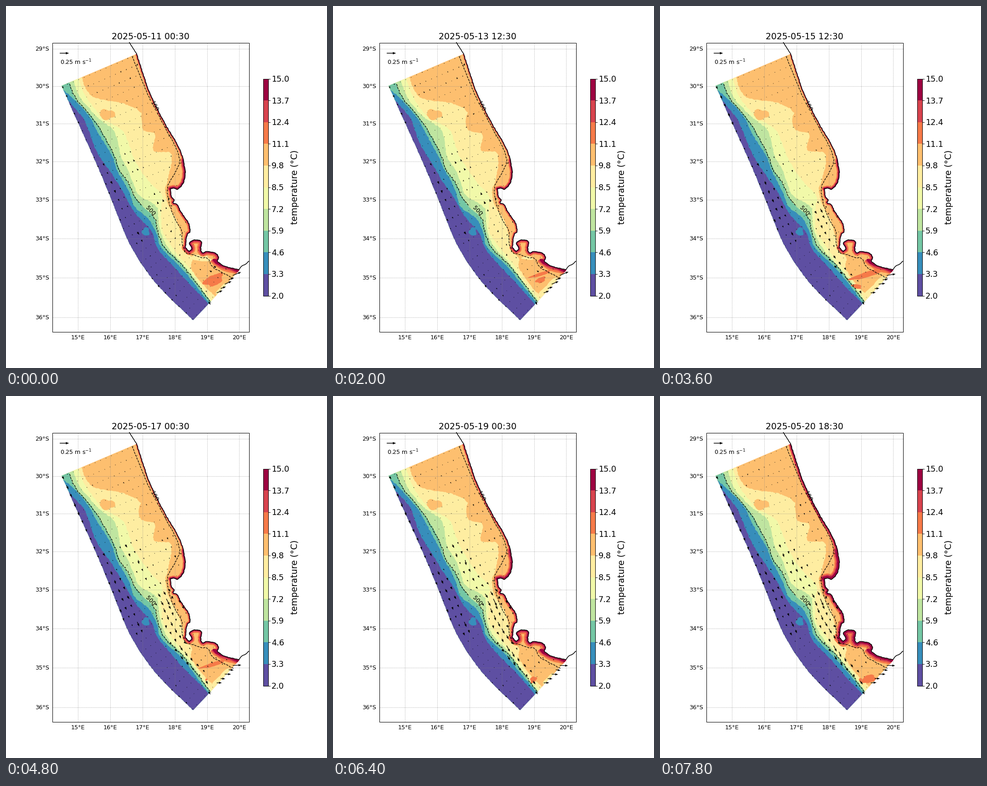
Write a matplotlib script that moves like this. It is 705 px wide and 794 px high and loops after 8 s.

```python
import numpy as np
import matplotlib.pyplot as plt
from matplotlib.animation import FuncAnimation
from matplotlib.patches import Polygon, Rectangle
from matplotlib.path import Path

W, H, DPI = 705, 794, 100
PT = 72 / DPI
KEYS = [0, 6, 14, 18, 24, 32, 39]
START = np.datetime64("2025-05-11T00:30")
LEVELS = np.linspace(2, 15, 11)
COLORS = plt.get_cmap("Spectral_r")(np.linspace(0, 1, 10))
rng = np.random.default_rng(7)

plt.rcParams["font.family"] = "DejaVu Sans"
fig = plt.figure(figsize=(W / DPI, H / DPI), dpi=DPI, facecolor="white")
ax = fig.add_axes([0, 0, 1, 1])
ax.set(xlim=(0, W), ylim=(H, 0))
ax.axis("off")


# ---------- helpers ----------
def arc_length(p):
    return np.r_[0, np.cumsum(np.hypot(*np.diff(p, axis=0).T))]


def along(pts, s):
    """Points at the fractions s of a polyline's length."""
    p = np.asarray(pts, float)
    arc = arc_length(p)
    return np.c_[np.interp(s * arc[-1], arc, p[:, 0]), np.interp(s * arc[-1], arc, p[:, 1])]


def smooth(pts):
    """One round of corner cutting, end points kept."""
    p = np.asarray(pts, float)
    a, b = p[:-1], p[1:]
    cut = np.stack([0.8 * a + 0.2 * b, 0.2 * a + 0.8 * b], 1).reshape(-1, 2)
    return np.vstack([p[:1], cut, p[-1:]])


def rough(pts, amp=0.7, step=3):
    p = smooth(pts)
    p = along(p, np.linspace(0, 1, max(int(arc_length(p)[-1] / step), 2) + 1))
    p[1:-1] += rng.uniform(-amp, amp, (len(p) - 2, 2))
    return p


def label(x, y, s, px, **kw):
    return ax.text(x, y, s, fontsize=px * PT, **{"va": "baseline", "zorder": 9, **kw})


# ---------- coast and model domain ----------
NORTH = [(287, 105), (302, 152), (317, 196), (350, 260), (381, 311), (390, 338)]
BAY = [(390, 338), (395, 373), (388, 392), (376, 404), (371, 399), (361, 401)]
WEST = [(361, 401), (363, 420), (371, 425), (366, 432), (377, 435), (384, 452),
        (402, 476), (405, 495), (397, 501), (394, 530)]
SOUTH = [(394, 530), (402, 539), (409, 533), (401, 520), (410, 513), (431, 514),
         (427, 535), (433, 543), (441, 537), (464, 543), (468, 553), (462, 560),
         (484, 573), (512, 578)]
OFFSHORE = [(122, 175), (160, 260), (195, 337), (232, 425), (265, 510),
            (290, 555), (324, 603), (360, 641), (411, 689)]

sections = [rough(s, 0.6) for s in (NORTH, BAY, WEST, SOUTH)]
coast = np.vstack([rough([(271, 80), (279, 93), NORTH[0]], 0.4), *sections,
                   rough([SOUTH[-1], (516, 571), (527, 566), (533, 560)], 0.4)])
domain_pts = np.vstack([*sections, [(512, 580), (447, 651)], rough(OFFSHORE, 0.5)[::-1]])
domain = ax.add_patch(Polygon(domain_pts, fc=COLORS[6], ec="none", zorder=1))


def region(band, z):
    p = ax.add_patch(Polygon(np.zeros((3, 2)), fc=COLORS[band], ec="none", zorder=z))
    p.set_clip_path(domain)
    return p


# ---------- isotherms ----------
# Where each isotherm crosses a set of heights, from cold to warm.
ROWS = [160, 200, 245, 270, 300, 330, 360, 390, 415, 440, 465, 495, 530, 570, 650]
T33 = [100, 130, 170, 180, 190, 206, 226, 245, 262, 275, 291, 322, 331, 366, 441]
T46 = [95, 146, 186, 198, 215, 234, 244, 262, 273, 279, 314, 330, 337, 383, 446]
T59 = [136, 150, 190, 207, 224, 239, 248, 271, 280, 299, 328, 333, 346, 390, 450]
T72 = [147, 161, 200, 238, 246, 250, 269, 281, 288, 334, 335, 338, 354, 393, 452]
T85 = [160, 174, 209, 257, 268, 278, 296, 318, 345, 342, 341, 342, 365, 399, 455]
T98 = [(167, 156), (174, 178), (188, 200), (220, 208), (250, 210), (297, 228),
       (297, 265), (303, 276), (331, 279), (321, 319), (345, 320), (361, 319),
       (365, 340), (356, 383), (348, 402), (355, 438), (373, 464), (386, 500),
       (390, 535), (411, 553), (405, 572), (420, 596), (440, 620), (462, 640)]


class Isotherm:
    """Everything offshore of the line takes the colour below its level."""

    def __init__(self, pts, band):
        self.line = rough(pts, 0.9)
        self.k = np.arange(len(self.line))
        self.phase = rng.uniform(0, 6)
        # a warm lobe that swells in the middle of the run
        gap = ((self.line - (295, 258)) ** 2).sum(1)
        self.lobe = np.outer(np.exp(-gap / 400), (-8, -4)) * (band == 5)
        self.patch = region(band, 2 + 0.1 * (5 - band))

    def update(self, i):
        p = self.line + self.lobe * np.sin(np.pi * i / 39)
        p[:, 0] += 0.9 * np.sin(self.k / 6 + self.phase + 0.3 * i)
        p[:, 1] += 0.7 * np.sin(self.k / 8 - self.phase + 0.2 * i)
        self.patch.set_xy(np.vstack([(60, p[0, 1] - 10), p, p[-1] + (12, 18),
                                     (420, 760), (0, 760)]))


isotherms = [Isotherm(T98, 5)] + [
    Isotherm(list(zip(xs, ROWS)), 4 - n) for n, xs in enumerate((T85, T72, T59, T46, T33))]


# ---------- patches that grow and fade ----------
class Blob:
    def __init__(self, band, x, y, rx, ry, turn, peak=None, span=1, z=3):
        a = np.linspace(0, 2 * np.pi, 40, endpoint=False)
        r = 1 + 0.13 * np.sin(3 * a + x) + 0.08 * np.sin(5 * a + y) + rng.uniform(-.05, .05, 40)
        c, s = np.cos(np.radians(turn)), np.sin(np.radians(turn))
        u, v = rx * r * np.cos(a), ry * r * np.sin(a)
        self.mid, self.shape = (x, y), np.c_[u * c - v * s, u * s + v * c]
        self.peak, self.span = peak, span
        self.patch = region(band, z)

    def update(self, i):
        k = 1 if self.peak is None else max(0, 1 - abs(i - self.peak) / self.span)
        self.patch.set_xy(self.mid + self.shape * np.sqrt(k))


blobs = [
    Blob(6, 222, 238, 17, 11, 0),
    Blob(1, 307, 495, 8, 9, 0),
    Blob(5, 427, 553, 23, 7, 5, 0, 14),
    Blob(5, 474, 622, 37, 14, -48, 16, 20),
    Blob(7, 456, 601, 25, 13, -22, 2, 10),
    Blob(7, 456, 588, 41, 6, -18, 18, 13),
    Blob(7, 432, 615, 12, 5, 12, 17, 7),
    Blob(7, 440, 622, 8, 6, -40, 32, 9),
    Blob(7, 458, 621, 18, 9, -15, 40, 8),
]
blobs += [Blob(7 + n, 490, 571 - n, 37, 14 - 3 * n, 20, z=3.2 + 0.2 * n) for n in range(3)]

# Warm strip along the coast: width of the three warmest bands per section.
strips = []
for pts, widths in zip(sections, [(3.2, 2.3, 0.8), (7, 5, 3), (5, 3, 1.4), (8, 5, 2.4)]):
    for n, width in enumerate(widths):
        line, = ax.plot(*pts.T, color=COLORS[7 + n], zorder=3.3 + 0.2 * n,
                        solid_capstyle="round", solid_joinstyle="round")
        line.set_clip_path(domain)
        strips.append((line, width))


def strip_width(width, i):
    return width * np.interp(i, [0, 8, 24, 39], [1, 0.8, 0.8, 1.3]) + np.interp(i, [30, 39], [0, 1.3])


# ---------- grid, depth contours, coast ----------
LEFT, TOP, RIGHT, BOTTOM = 101.5, 80.5, 533.5, 714.5
DEG = 70.8


def mercator(lat):
    return np.degrees(np.log(np.tan(np.pi / 4 + np.radians(lat) / 2)))


grid = dict(color="gray", lw=0.74, ls=":", alpha=0.75, zorder=4.2)
for lon in range(15, 21):
    x = 158.3 + DEG * (lon - 15)
    ax.plot([x, x], [BOTTOM, TOP], **grid)
    label(x, 731, f"{lon}°E", 12.7, ha="center")
for lat in range(29, 37):
    y = 94.3 + DEG * (mercator(lat) - mercator(29))
    ax.plot([LEFT, RIGHT], [y, y], **grid)
    label(94.5, y + 4, f"{lat}°S", 12.7, ha="right")

SHALLOW = [(332, 234), (350, 268), (376, 315), (383, 342), (369, 370), (353, 397),
           (356, 425), (370, 467), (387, 492), (386, 520), (394, 542), (413, 546),
           (428, 552), (444, 552), (452, 573), (476, 585), (500, 598)]
deep = rough(list(zip(T59, ROWS)), 1.3)
isobaths = [rough([(277, 110), (299, 165), (318, 209)], 0.4), rough(SHALLOW, 0.6),
            deep[(deep[:, 1] > 170) & (deep[:, 1] < 440)], deep[deep[:, 1] > 458]]
for p in isobaths:
    ax.plot(*p.T, color="black", lw=0.92, ls="--", zorder=5)
label(325.5, 220.5, "100", 12.7, rotation=-62, ha="center", va="center")
label(317, 449, "500", 12.7, rotation=-46, ha="center", va="center")
ax.plot(*coast.T, color="black", lw=1.1, zorder=5.5, solid_joinstyle="round")

# ---------- currents ----------
frac = np.linspace(0.004, 0.996, 29)
rows = along(OFFSHORE, frac)
tilt = np.radians(np.interp(frac, [0, 0.54, 0.7, 0.88, 1], [23, 22, 34, 45, 47.5]))
reach = 1 + 13 * np.arange(24)[:, None, None]
nodes = (rows + reach * np.c_[np.cos(tilt), -np.sin(tilt)]).reshape(-1, 2)
nodes = nodes[Path(domain_pts).contains_points(nodes)]
px, py = nodes.T

# Each jet: end points, half width, steady flow, flow that turns with the wind.
JETS = [
    ((200, 180), (285, 150), 35, (0, -1), (1, 3)),
    ((310, 230), (365, 345), 25, (2, 0), (0, 4)),
    ((270, 335), (342, 430), 24, (0, 0), (4, 8)),
    ((345, 450), (385, 555), 17, (2, 2), (3, 9)),
    ((390, 565), (435, 625), 12, (3, 5), (3, 4)),
    ((215, 345), (300, 525), 11, (4, 7), (1, 2.5)),
    ((124, 178), (255, 490), 6, (3, 6), (1, 3)),
    ((300, 568), (400, 675), 12, (2, 3), (0, -1)),
    ((461, 633), (503, 587), 5, (17, -4), (0, 4)),
    ((447, 649), (447, 649), 5, (4, 9), (0, 0)),
    ((425, 590), (470, 580), 17, (-1, 0), (5, 5)),
    ((368, 425), (398, 490), 8, (0, 0), (2, 5)),
]


def weight(a, b, r):
    a, d = np.array(a, float), np.subtract(b, a)
    t = np.clip((nodes - a) @ d / max(d @ d, 1e-9), 0, 1)
    gap = nodes - a - t[:, None] * d
    return np.exp(-(gap ** 2).sum(1) / r ** 2)[:, None]


weights = [weight(*jet[:3]) for jet in JETS]
gain = rng.uniform(0.6, 1.15, (len(nodes), 1))
drift = rng.normal(0, 0.7, (len(nodes), 2))


def flow(i):
    wind = np.interp(i, KEYS, [-0.5, -0.85, -0.35, 0.4, 0.8, 1, 1])
    uv = sum(w * np.add(jet[3], np.multiply(jet[4], wind)) for w, jet in zip(weights, JETS))
    swirl = np.c_[np.sin(py / 19 + 0.15 * i), np.cos(px / 17 - 0.12 * i)]
    return uv * gain + 0.8 * swirl + drift


arrow = dict(angles="xy", scale_units="xy", scale=1, units="dots", headwidth=3.6,
             color="black", zorder=7)
quiver = ax.quiver(px, py, *flow(0).T, width=1.3, **arrow)
ax.quiver([118], [103.5], [20.5], [0], width=1.5, **arrow)
label(119, 128.5, "0.25 m s$^{-1}$", 12.7)

# ---------- frame, title, colour bar ----------
ax.add_patch(Rectangle((LEFT, TOP), RIGHT - LEFT, BOTTOM - TOP, fill=False, lw=0.75, zorder=8))
title = label(317.5, 73, "", 19.05, ha="center")

BAR_X, BAR_W, BAR_TOP, BAR_END = 564.5, 11, 159.5, 635.5
step = (BAR_END - BAR_TOP) / 10
for k, color in enumerate(COLORS):
    ax.add_patch(Rectangle((BAR_X, BAR_END - (k + 1) * step), BAR_W, step, fc=color, lw=0,
                           antialiased=False))
ax.add_patch(Rectangle((BAR_X, BAR_TOP), BAR_W, BAR_END - BAR_TOP, fill=False, lw=0.75))
for k, level in enumerate(LEVELS):
    y = BAR_END - k * step
    ax.plot([BAR_X + BAR_W, BAR_X + BAR_W + 4.5], [y, y], color="black", lw=0.75)
    label(583, y + 6.5, f"{level:.1f}", 17.6)
label(634.5, 397.5, "temperature (°C)", 19.05, rotation=90, ha="center", va="center")


def update(i):
    title.set_text(str(START + np.timedelta64(6 * i, "h")).replace("T", " "))
    for part in isotherms + blobs:
        part.update(i)
    for line, width in strips:
        line.set_linewidth(2 * PT * strip_width(width, i))
    quiver.set_UVC(*flow(i).T)
    return []


anim = FuncAnimation(fig, update, frames=40, interval=200,
                     init_func=lambda: [], repeat=True, repeat_delay=0)
plt.show()
```
